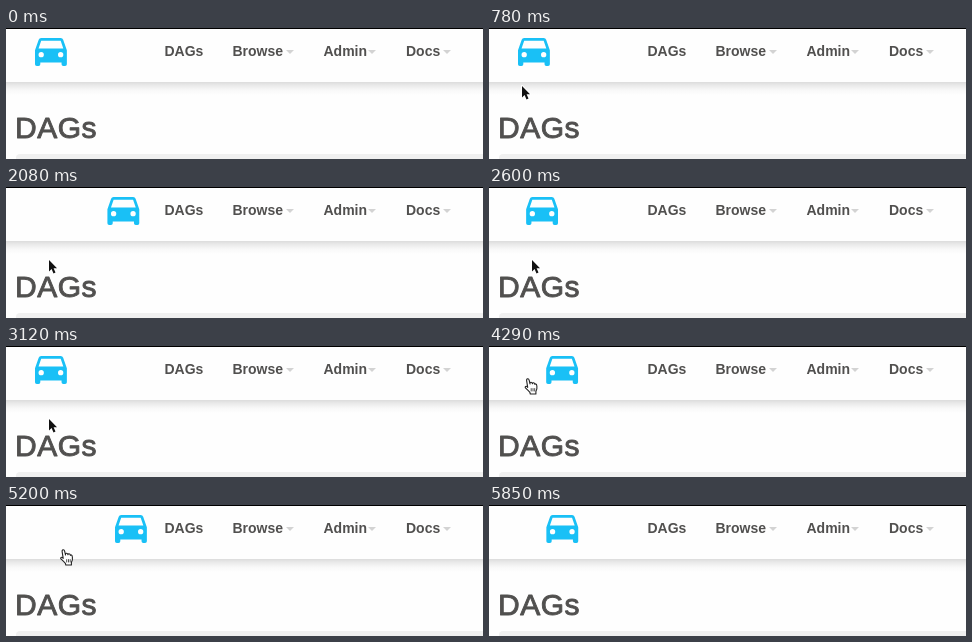
Write an HTML page with a canvas that moves like this. It is 477x131 px and loops after 5.98 s.

```html
<!DOCTYPE html>
<html lang="en">
<head>
<meta charset="utf-8">
<title>DAGs</title>
<style>
html, body { margin: 0; width: 100%; height: 100%; overflow: hidden; background: #fefefe; }
canvas { display: block; }
</style>
</head>
<body>
<canvas id="stage"></canvas>
<script>
const W = 477, H = 131, LOOP = 5980, STEP = 130;
const INK = '#51504f', SKY = '#19c0f6';
const canvas = document.getElementById('stage');
const ctx = canvas.getContext('2d');
const ratio = window.devicePixelRatio || 1;
canvas.width = W * ratio;
canvas.height = H * ratio;
canvas.style.width = W + 'px';
canvas.style.height = H + 'px';

const menu = [['DAGs', 158.5], ['Browse', 226.5, 280], ['Admin', 317.5, 362], ['Docs', 400, 437]];

// Car on a 24-unit grid; windscreen and lamps are holes
const car = new Path2D(
  'M18.92 6Q18.6 5 17.5 5H6.5Q5.4 5 5.08 6L3 12V20Q3 21 4 21H5Q6 21 6 20V19H18V20' +
  'Q18 21 19 21H20Q21 21 21 20V12Z M5 11L6.5 6.5H17.5L19 11Z');
for (const x of [6.5, 17.5]) {
  car.moveTo(x + 1.5, 14.5);
  car.arc(x, 14.5, 1.5, 0, Math.PI * 2);
}

const arrow = new Path2D('M0 0V11.5L2.6 9.1L4.5 13.4L6.5 12.5L4.6 8.3H8Z');
const hand = new Path2D(
  'M3.2 9.4L2.2 3.2Q1.8 1 3.1 .8Q4.3 .6 4.7 2.4L5.5 6Q5.2 4.3 6.4 4.2Q7.6 4.1 8 5.8' +
  'Q8 4.7 9 4.8Q10 4.9 10.4 6.4Q10.6 5.7 11.4 6Q12.2 6.3 12.4 8.2Q12.8 11.6 11.4 13.4' +
  'L11.4 16H5.8L5.4 14.4Q3.8 12.6 1.2 10.2Q.2 9 1.2 8.4Q2 8 3.2 9.4Z');
const creases = new Path2D('M6.7 10.2V13.4M8.5 10.2V13.4M10.2 10.2V13.4');

// Pointer tip over time: [ms, x, y]
const trails = [
  [[520, 22, 92], [780, 33, 58], [910, 38, 40], [1300, 41, 24.5], [1690, 43, 35],
   [1820, 43, 35], [1950, 43, 58], [2080, 43, 73], [3770, 43, 73], [3900, 42, 67],
   [4030, 40, 55], [4160, 39, 42], [4290, 38.5, 32.5], [4810, 47, 36], [5200, 57, 44.5],
   [5460, 58, 52], [5720, 60, 86]]
];

// Standard CSS "ease", solved by bisection
function ease(p) {
  if (p <= 0) return 0;
  if (p >= 1) return 1;
  const bez = (a, b, u) => 3 * a * u * (1 - u) ** 2 + 3 * b * u * u * (1 - u) + u ** 3;
  let lo = 0, hi = 1;
  for (let i = 0; i < 24; i++) {
    const mid = (lo + hi) / 2;
    if (bez(0.25, 0.25, mid) < p) lo = mid; else hi = mid;
  }
  return bez(0.1, 1, lo);
}

const slide = (t, start) => ease((t - start) / 1000);

function carOffset(t) {
  return 80 * (slide(t, 900) - slide(t, 1980) + slide(t, 4065) - slide(t, 5475));
}

function pointerAt(t) {
  for (const trail of trails) {
    for (let i = 0; i < trail.length; i++) {
      const a = trail[i], b = trail[i + 1] || a;
      if (t === a[0]) return [a[1], a[2]];
      if (t > a[0] && t < b[0]) {
        const k = (t - a[0]) / (b[0] - a[0]);
        return [a[1] + (b[1] - a[1]) * k, a[2] + (b[2] - a[2]) * k];
      }
    }
  }
  return null;
}

function drawPage() {
  ctx.fillStyle = '#fefefe';
  ctx.fillRect(0, 0, W, H);
  const shade = ctx.createLinearGradient(0, 53, 0, 67);
  shade.addColorStop(0, '#d8d8d8');
  shade.addColorStop(0.3, '#e9e9e9');
  shade.addColorStop(0.65, '#f8f8f8');
  shade.addColorStop(1, '#fefefe');
  ctx.fillStyle = shade;
  ctx.fillRect(0, 53, W, 14);
  ctx.fillStyle = '#fefefe';
  ctx.fillRect(0, 0, W, 54);
  ctx.fillStyle = '#000';
  ctx.fillRect(0, 0, W, 1);

  ctx.fillStyle = '#f0f0f0';
  ctx.beginPath();
  ctx.roundRect(10, 126, W, 20, 4);
  ctx.fill();

  ctx.font = 'bold 14px "Liberation Sans", Arial, sans-serif';
  ctx.letterSpacing = '0px';
  for (const [label, x, caret] of menu) {
    ctx.fillStyle = INK;
    ctx.fillText(label, x, 28);
    if (!caret) continue;
    ctx.fillStyle = '#d3d3d3';
    ctx.beginPath();
    ctx.moveTo(caret, 22);
    ctx.lineTo(caret + 8, 22);
    ctx.lineTo(caret + 4, 26);
    ctx.fill();
  }

  ctx.font = '30px "Liberation Sans", Arial, sans-serif';
  ctx.letterSpacing = '0.5px';
  ctx.fillStyle = ctx.strokeStyle = INK;
  ctx.lineWidth = 0.9;
  ctx.lineJoin = 'round';
  ctx.fillText('DAGs', 9, 110);
  ctx.strokeText('DAGs', 9, 110);
}

function drawCar(offset) {
  ctx.save();
  ctx.translate(29 + offset, 10);
  ctx.scale(1.77, 1.75);
  ctx.translate(-3, -5);
  ctx.fillStyle = SKY;
  ctx.fill(car, 'evenodd');
  ctx.restore();
}

function drawPointer(x, y) {
  ctx.save();
  ctx.lineJoin = 'round';
  if (y < 54) {
    ctx.translate(x - 3, y - 0.5);
    ctx.fillStyle = '#fff';
    ctx.strokeStyle = '#222';
    ctx.lineWidth = 1.1;
    ctx.fill(hand);
    ctx.stroke(hand);
    ctx.lineWidth = 0.8;
    ctx.stroke(creases);
  } else {
    ctx.translate(x, y);
    ctx.strokeStyle = '#fff';
    ctx.lineWidth = 2;
    ctx.stroke(arrow);
    ctx.fillStyle = '#111';
    ctx.fill(arrow);
  }
  ctx.restore();
}

function render(now) {
  const t = Math.floor((now % LOOP) / STEP) * STEP;
  ctx.setTransform(ratio, 0, 0, ratio, 0, 0);
  drawPage();
  drawCar(carOffset(t));
  const tip = pointerAt(t);
  if (tip) drawPointer(...tip);
}

const begin = performance.now();
function tick() {
  render(performance.now() - begin);
  requestAnimationFrame(tick);
}
tick();
</script>
</body>
</html>
```
